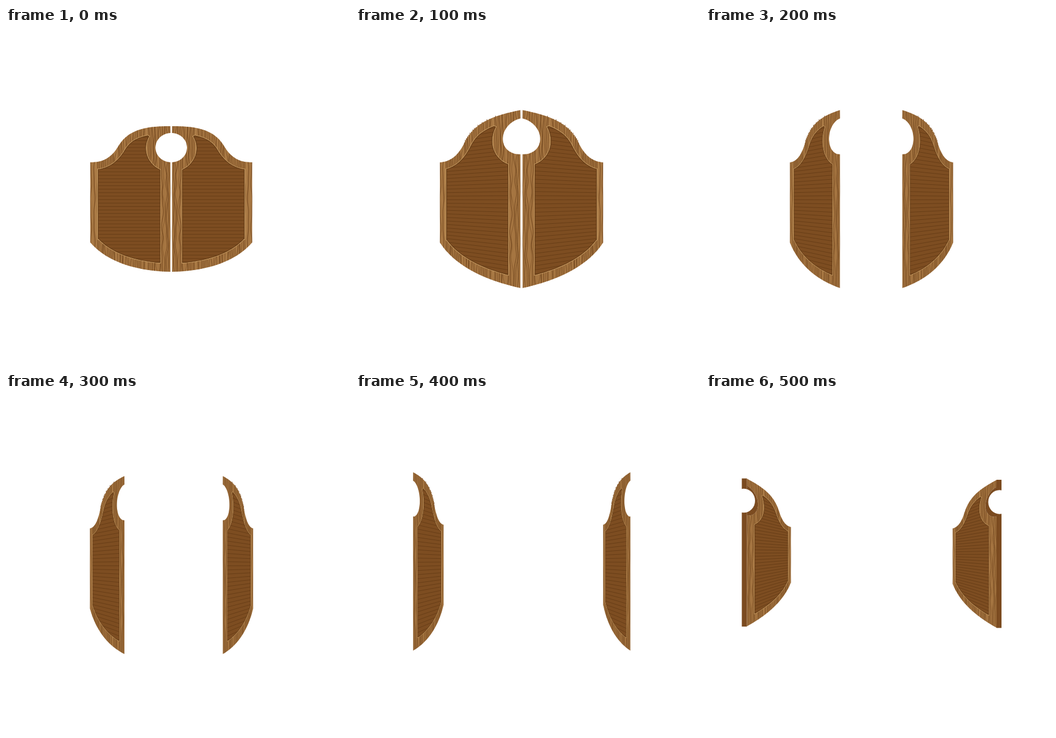
These frames come from a looping animation (610x599 px, 600 ms). An HTML page with a canvas:

```html
<!DOCTYPE html>
<html lang="en">
<head>
<meta charset="utf-8">
<title>Swing doors</title>
<style>
  html, body { margin: 0; width: 100%; height: 100%; overflow: hidden; background: #fff; }
  canvas { display: block; }
</style>
</head>
<body>
<canvas id="stage" width="610" height="599"></canvas>
<script>
const ctx = document.getElementById('stage').getContext('2d');
const STEP = 100;
const WOOD = '#a57541', PANEL = '#7d4d21', GROOVE = '#623a15', EDGE = '#7b4b20', LIGHT = '#c49860';

// Flat door: hinge on the left, free edge on the right.
const HINGE = 149.5, FREE = 291.5, MID = 303, RAIL = 13.5, STILE = 18;
const WIDTH = FREE - HINGE;

// Both doors mirror each other about the axis; reach is the way from axis to hinge.
const VIEW = {
  flat:   { axis: 293, reach: 143.5, mid: 303, scale: 1, bulge: 1, skew: 0 },
  swing:  { axis: 293.5, reach: 144.7, mid: 303.2, scale: 1, bulge: 1.222, skew: 0 },
  beyond: { axis: 296.8, reach: 141.5, mid: 296.8, scale: 1, bulge: 1.225, skew: 0 },
  deep:   { axis: 294, reach: 143.5, mid: 282.1, scale: .693, bulge: 1.463, skew: 1.2 }
};
// Visible width of the left and right door; negative once it has passed the hinge.
const STEPS = [
  ['flat', 142, 142], ['swing', 142.7, 142.8], ['swing', 88.7, 90],
  ['swing', 61.2, 53.7], ['beyond', -54, -48.2], ['deep', -78, -77.5]
];

function random(seed) {
  return () => {
    seed = (seed * 16807) % 2147483647;
    return seed / 2147483647;
  };
}

function curve(a, b, c, d, n = 24) {
  return Array.from({ length: n + 1 }, (_, i) => {
    const t = i / n, q = 1 - t;
    return [0, 1].map(k => q * q * q * a[k] + 3 * q * q * t * b[k] + 3 * q * t * t * c[k] + t * t * t * d[k]);
  });
}

function arc(cx, cy, rx, ry, from, to, n = 32) {
  return Array.from({ length: n + 1 }, (_, i) => {
    const a = from + (to - from) * i / n;
    return [cx + rx * Math.cos(a), cy + ry * Math.sin(a)];
  });
}

// Moves a line sideways, to the right of its direction of travel.
function offset(points, by) {
  return points.map(([x, y], i) => {
    const a = points[Math.max(0, i - 1)], b = points[Math.min(points.length - 1, i + 1)];
    const dx = b[0] - a[0], dy = b[1] - a[1], len = Math.hypot(dx, dy);
    return [x - dy / len * by, y + dx / len * by];
  });
}

const shoulder = [
  ...curve([HINGE, 238], [176, 238.5], [188, 226], [197, 213]),
  ...curve([197, 213], [211, 188], [232, 173.5], [FREE, 174]).slice(1)
];
const hole = arc(FREE + 1.5, 212, 28, 26, -Math.PI / 2 - .05, -Math.PI * 1.5 + .05);
const sill = curve([FREE, 432], [235, 431], [180, 416], [HINGE, 380]);
const outer = [...shoulder, ...hole, ...sill];
const inset = makeInset();
const grain = makeGrain();

// The panel follows the rim, then the ring around the hole, then the stile.
function makeInset() {
  const cx = 293, cy = 213, rx = 45, ry = 42.5, left = HINGE + RAIL, right = FREE - STILE;
  const top = offset(shoulder, RAIL).filter(([x, y]) =>
    x >= left && x < cx && Math.hypot((x - cx) / rx, (y - cy) / ry) > 1);
  const [tx, ty] = top[top.length - 1];
  const from = Math.atan2((ty - cy) / ry, (tx - cx) / rx);
  const to = -2 * Math.PI + Math.acos((right - cx) / rx);
  const low = offset(sill, RAIL + 1.5).filter(([x]) => x >= left && x <= right);
  return [[left, top[0][1]], ...top, ...arc(cx, cy, rx, ry, from, to),
    [right, low[0][1]], ...low, [left, low[low.length - 1][1]]];
}

function makeGrain() {
  const rnd = random(4127), lines = [];
  const knots = Array.from({ length: 16 }, (_, i) =>
    [i % 2 ? 268 + rnd() * 20 : 150 + rnd() * 110, 180 + i * 16]);
  for (let x = HINGE + 1; x < FREE; x += 1.8 + rnd() * 1.6) {
    const phase = rnd() * 7, amp = .5 + rnd() * .7, points = [];
    for (let y = 170; y <= 436; y += 4) {
      let px = x + amp * Math.sin(y / 13 + phase) + .4 * Math.sin(y / 6 + phase * 2);
      for (const [kx, ky] of knots) {
        const dx = x - kx, dy = y - ky;
        px += Math.sign(dx) * 2.6 * Math.exp(-dx * dx / 30 - dy * dy / 140);
      }
      points.push([px, y]);
    }
    lines.push({ points, dark: rnd() < .85, width: .6 + rnd() * .6 });
  }
  return lines;
}

// Perspective of a door turned on its hinge; side is -1 for left, 1 for right.
function projector(view, side, span) {
  const { axis, reach, mid, scale, bulge, skew } = view;
  return (x, y) => {
    const u = (x - HINGE) / WIDTH, k = u / (u + bulge * (1 - u));
    return [axis + side * (reach - span * k),
      mid + side * skew + (y - MID) * scale * (1 + (bulge - 1) * k)];
  };
}

function trace(points, project, close) {
  ctx.beginPath();
  for (const [x, y] of points) ctx.lineTo(...project(x, y));
  if (close) ctx.closePath();
}

function stroke(color, width) {
  ctx.strokeStyle = color;
  ctx.lineWidth = width;
  ctx.stroke();
}

function drawSplinters(project) {
  const rnd = random(91);
  for (const [x, y] of shoulder) {
    if (x < 198 || x > 255) continue;
    const [px, py] = project(x, y);
    ctx.beginPath();
    ctx.moveTo(px, py + 1);
    ctx.lineTo(px, py - rnd() * 2.2);
    stroke(EDGE, 1);
  }
}

function drawDoor(project, squeeze) {
  trace(outer, project, true);
  ctx.fillStyle = WOOD;
  ctx.fill();
  ctx.save();
  ctx.clip();
  for (const line of grain) {
    trace(line.points, project);
    stroke(line.dark ? 'rgba(108,66,27,.8)' : 'rgba(186,140,84,.7)', line.width * squeeze);
  }
  ctx.restore();

  trace(inset, project, true);
  stroke(LIGHT, 2.4 * squeeze);
  ctx.fillStyle = PANEL;
  ctx.fill();
  ctx.save();
  ctx.clip();
  stroke(GROOVE, 2 * squeeze);
  for (let y = 193.4; y < 416; y += 6.15) {
    trace([[160, y], [276, y]], project);
    stroke(GROOVE, .8);
  }
  ctx.restore();
}

// The thick free edge, seen once the door stands deep in the room.
function drawThickness(project, side) {
  const [x, top] = project(FREE, 174), bottom = project(FREE, 432)[1];
  ctx.fillStyle = EDGE;
  ctx.fillRect(side < 0 ? x - 9 : x, top - .5, 9, bottom - top + 1);
  trace(hole, project, true);
  ctx.fill();
  ctx.fillStyle = '#fff';
  ctx.beginPath();
  ctx.ellipse(x + side * 5.5, project(FREE, 212)[1] + .4, 20, 21.2, 0, 0, Math.PI * 2);
  ctx.fill();
}

function draw([name, left, right]) {
  ctx.fillStyle = '#fff';
  ctx.fillRect(0, 0, 610, 599);
  for (const [side, span] of [[-1, left], [1, right]]) {
    const project = projector(VIEW[name], side, span);
    if (name === 'swing' || name === 'beyond') drawSplinters(project);
    drawDoor(project, Math.max(.5, Math.sqrt(Math.abs(span) / WIDTH)));
    if (name === 'deep') drawThickness(project, side);
  }
}

let shown = -1, start;
function tick(now) {
  start ??= now;
  const i = Math.floor((now - start) / STEP) % STEPS.length;
  if (i !== shown) draw(STEPS[shown = i]);
  requestAnimationFrame(tick);
}
draw(STEPS[0]);
requestAnimationFrame(tick);
</script>
</body>
</html>
```
